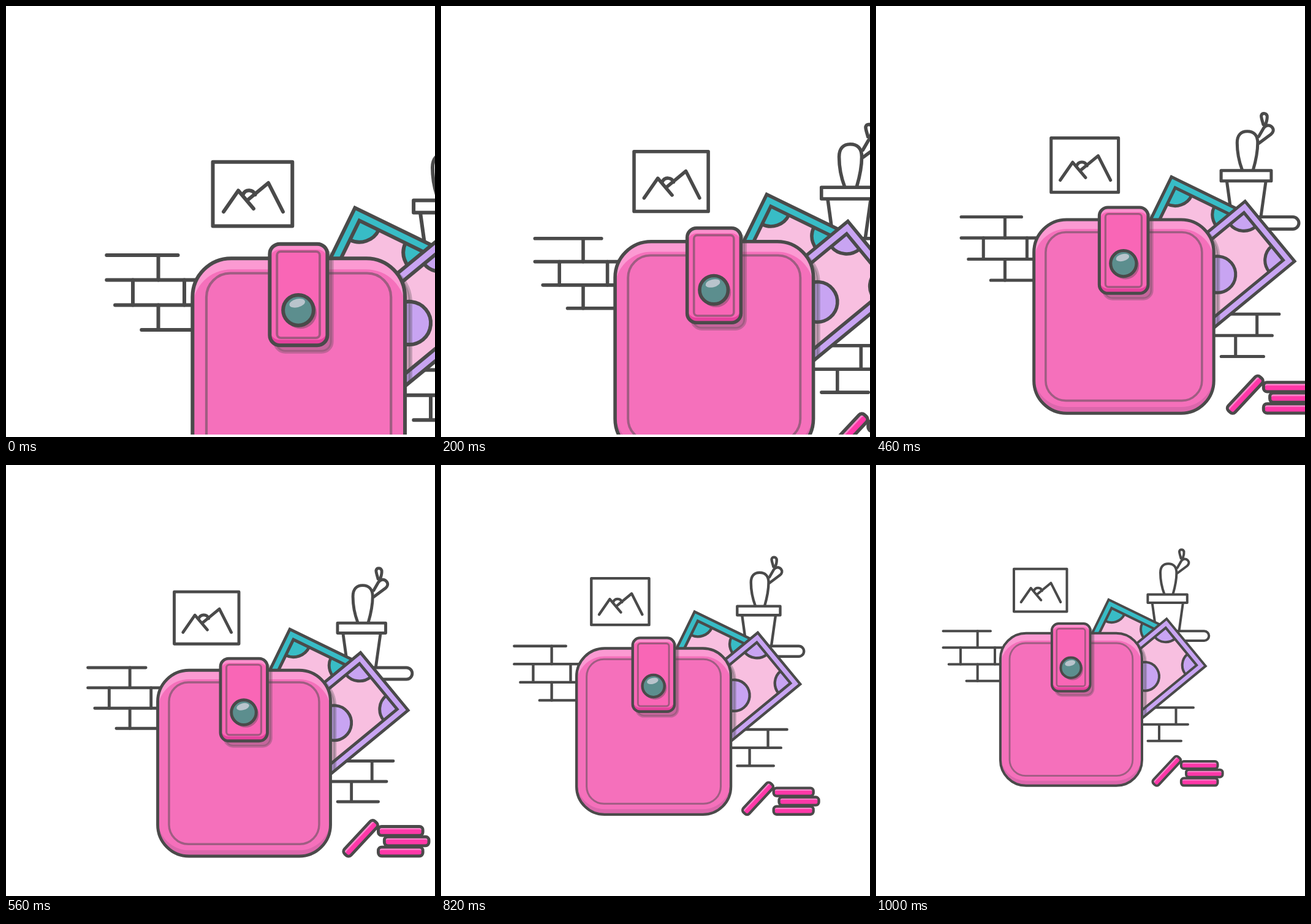
These frames come from a looping animation (700 by 704 pixels, 1.6 s). An HTML page with a canvas:

```html
<!DOCTYPE html>
<html lang="en">
<head>
<meta charset="utf-8">
<title>Wallet</title>
<style>
html, body { margin: 0; width: 100%; height: 100%; overflow: hidden; background: #fff; }
canvas { display: block; }
</style>
</head>
<body>
<canvas id="stage" width="700" height="704"></canvas>
<script>
const ctx = document.getElementById('stage').getContext('2d');
const LOOP = 1600, ZOOM = 1000, STEP = 20;
const INK = '#4a4a4a', SEAM = 'rgba(74,74,74,0.5)';
const NOTE_W = 100, NOTE_H = 174.6, RIM = 10.4;

function box(x, y, w, h, r = 0) {
  const p = new Path2D();
  p.roundRect(x, y, w, h, r);
  return p;
}

function outline(path, color = INK, width = 4) {
  ctx.strokeStyle = color;
  ctx.lineWidth = width;
  ctx.stroke(path);
}

function fill(path, color) {
  ctx.fillStyle = color;
  ctx.fill(path);
}

function line(d) { outline(new Path2D(d)); }

function disc(x, y, r, color) {
  const p = new Path2D();
  p.arc(x, y, r, 0, 7);
  fill(p, color);
  outline(p);
}

// Rounded panel with a light upper and a dark lower edge.
function panel(x, y, w, h, r, colors, up, down) {
  const shape = box(x, y, w, h, r);
  const [light, base, dark] = colors;
  ctx.save();
  ctx.clip(shape);
  fill(shape, light);
  fill(box(x, y + up, w, h, r), base);
  if (down) {
    const low = box(x - 5, y - 60, w + 10, h + 70);
    low.addPath(box(x, y - down, w, h, r));
    ctx.fillStyle = dark;
    ctx.fill(low, 'evenodd');
  }
  ctx.restore();
  outline(shape);
}

function shade(path) {
  fill(path, 'rgba(74,74,74,0.28)');
  outline(path, 'rgba(74,74,74,0.3)');
}

function scenery() {
  outline(box(225, 169.8, 86.5, 69.8));
  line('M236.7 224L252.7 201L269.3 220.7M262 212L285.4 192.7L301.3 224M258 205A7 7 0 0 1 271 205.5');

  line('M109.5 271.3H187M109.5 298.3H215M118.7 325.6H215M147.5 352.7H215');
  line('M165.7 271.3V298.3M138 298.3V325.6M194 298.3V325.6M165.7 325.6V352.7');
  line('M400 396.3H518M400 423.8H509M443.5 450.8H498M489.5 396.3V423.8M462 423.8V450.8');

  line('M460 271.3H535.5A7.8 7.8 0 0 1 535.5 286.9H460');
  line('M450.8 226L457 271M500.8 226L494.5 271');
  outline(box(443.4, 211.6, 64.4, 13.4));
  line('M470.5 211C466 199 464 186 464 176C464 166 469 161.2 477 161.2' +
       'C485 161.2 490.4 166 490.4 176C490.4 187 488 199 484.5 211');
  line('M491.7 168L498 157C501 152.5 506 152.5 509 156C511.5 159 510.5 162.5 507.5 165L492 176.5');
  line('M497.6 152.5C496.5 148 494.8 144 495 141C496 137.2 501 137.2 502.5 141.2C503 146 501.5 149.5 500.5 152.5');
}

function note(x, y, angle, color, shadow) {
  const outer = box(0, 0, NOTE_W, NOTE_H);
  const inner = box(RIM, RIM, NOTE_W - 2 * RIM, NOTE_H - 2 * RIM);
  ctx.save();
  ctx.translate(x, y);
  ctx.rotate(angle * Math.PI / 180);
  ctx.lineJoin = 'miter';
  fill(outer, color);
  fill(inner, '#f8bfe0');
  ctx.save();
  ctx.clip(inner);
  disc(RIM, RIM, 23.4, color);
  disc(NOTE_W - RIM, RIM, 23.4, color);
  disc(NOTE_W / 2, NOTE_H / 2, 23.4, color);
  ctx.restore();
  outline(inner);
  outline(outer);
  if (shadow) {
    ctx.clip(outer);
    ctx.rotate(-angle * Math.PI / 180);
    ctx.translate(-x, -y);
    shade(shadow);
  }
  ctx.restore();
}

function wallet() {
  panel(202.9, 274.8, 231.1, 249, 42, ['#fb9ad2', '#f570bb', '#dc67ac'], 12, 8);
  outline(box(218, 291, 200.8, 216.6, 26), SEAM, 2.8);

  shade(box(292.8, 265.8, 61.6, 110.7, 11));
  panel(286.9, 259.1, 62.7, 110.4, 11, ['#fb90cd', '#f966b6', '#e5429d'], 6, 6);
  outline(box(294.8, 267.4, 46.5, 94, 4), SEAM, 2.6);

  const under = new Path2D();
  under.arc(320.5, 334, 17.5, 0, 7);
  fill(under, 'rgba(74,74,74,0.4)');
  disc(318, 331.2, 16.6, '#5c8e8e');
  const glint = new Path2D();
  glint.ellipse(316.8, 323.6, 8.7, 4.5, -0.25, 0, 7);
  fill(glint, '#b9c4cc');
}

function coin(x, y, angle = 0) {
  ctx.save();
  ctx.translate(x, y);
  ctx.rotate(angle * Math.PI / 180);
  panel(-29.8, -6, 59.6, 12, 4.5, ['#fb86cc', '#ff38a8'], 4, 0);
  ctx.restore();
}

function draw(time) {
  const t = Math.floor((time % LOOP) / STEP) * STEP;
  const zoom = 1.5 - 0.5 * Math.min(1, t / ZOOM);
  ctx.setTransform(1, 0, 0, 1, 0, 0);
  ctx.fillStyle = '#fff';
  ctx.fillRect(0, 0, 700, 704);
  ctx.save();
  ctx.beginPath();
  ctx.rect(0, 0, 700, 700);
  ctx.clip();
  ctx.scale(zoom, zoom);
  ctx.lineCap = ctx.lineJoin = 'round';
  scenery();
  note(379.6, 219.8, 26, '#38bcc6');
  note(474.2, 251.2, 50.5, '#c8a4f2', box(209, 281, 231, 249, 42));
  wallet();
  coin(527.7, 490);
  coin(527.7, 517.6);
  coin(535.8, 503.7);
  coin(474.3, 499.8, -47);
  ctx.restore();
}

let start;
function tick(now) {
  if (start === undefined) start = now;
  draw(now - start);
  requestAnimationFrame(tick);
}
draw(0);
requestAnimationFrame(tick);
</script>
</body>
</html>
```
